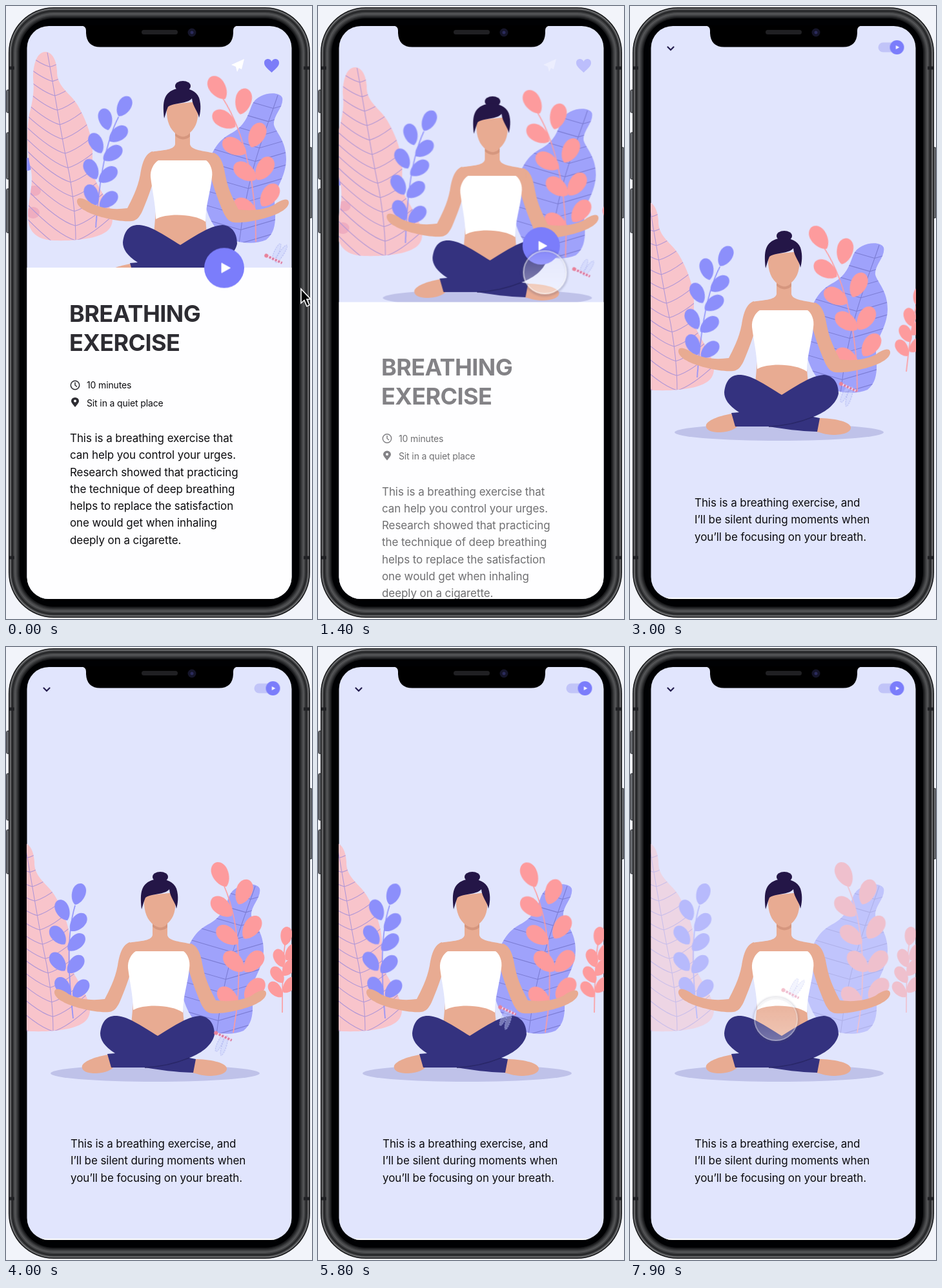
Write an HTML page that moves like this. It is 474x949 px and loops after 8000 ms.

```html
<!DOCTYPE html>
<html lang="en">
<head>
<meta charset="utf-8">
<title>Breathing exercise</title>
<style>
html, body { margin: 0; width: 100%; height: 100%; overflow: hidden; background: #f2f4fa; }
svg { display: block; width: 100vw; height: 100vh; }
text { font-family: Inter, Roboto, sans-serif; fill: #0c0c0f; }
.body { font-size: 17px; letter-spacing: -.08px; }
.small { font-size: 14px; letter-spacing: -.13px; }
.title { font-size: 36px; font-weight: 700; letter-spacing: -.6px; fill: #2d2c32; }
.skin { fill: #e8ab92; }
.navy { fill: #34327f; }
.vein { fill: none; stroke-width: 1.1; }

.anim { animation: 8s ease-in-out infinite; }
#scene { animation-name: scene; }
#panel { animation-name: panel; }
#info { animation-name: info; }
#button { animation-name: button; }
#actions { animation-name: out; }
#controls { animation-name: in; }
.plants { animation-name: fade; }
#blueSprig { animation-name: sway; --lean: 10.7deg; transform-origin: 104px 575px; }
#pinkSprig { animation-name: sway; --lean: -9.4deg; transform-origin: 352px 597px; }
#sideSprig { animation-name: sway; --lean: 6.5deg; transform-origin: 428px 566px; }
#fly { animation-name: fly; }
#wings { animation-name: flap; }
#touch { animation-name: touch; }
#cursor { animation-name: cursor; animation-timing-function: linear; }

@keyframes scene {
  0%, 15.5% { transform: translate(35px, -232px); }
  24.5%, 100% { transform: none; }
}
@keyframes panel {
  0%, 12.5% { transform: none; }
  13.5%, 15.5% { transform: translateY(1px); }
  24.5%, 100% { transform: translateY(511px); }
}
@keyframes info {
  0%, 12.5% { transform: none; opacity: 1; }
  13.5%, 15.5% { transform: translateY(1px); opacity: 1; }
  20%, 100% { transform: translateY(200px); opacity: 0; }
}
@keyframes button {
  0%, 12.5% { transform: translate(338px, 405.5px); }
  13.5%, 15.5% { transform: translate(338px, 406.5px); }
  24.5%, 100% { transform: translate(413.5px, 64px) scale(.355); }
}
@keyframes out {
  0%, 15.5% { opacity: 1; }
  19%, 100% { opacity: 0; }
}
@keyframes in {
  0%, 19% { opacity: 0; }
  25%, 100% { opacity: 1; }
}
@keyframes fade {
  0%, 94% { opacity: 1; }
  98.75% { opacity: .5; }
  100% { opacity: .4; }
}
@keyframes sway {
  0%, 13.75%, 38%, 63%, 87.6% { transform: rotate(var(--lean)); }
  25.5%, 50.5%, 75.5%, 100% { transform: none; }
}
@keyframes fly {
  0%, 15.5% { transform: translate(380px, 624px) rotate(25deg); }
  26.25% { transform: translate(340px, 580px) rotate(25deg); }
  50% { transform: translate(337px, 603px) rotate(25deg); }
  72.5% { transform: translate(294px, 563px) rotate(25deg); }
  87.5% { transform: translate(294px, 581px) rotate(33deg); }
  98.75%, 100% { transform: translate(249px, 537px) rotate(27deg); }
}
@keyframes flap {
  0%, 15.5%, 98%, 100% { transform: none; }
  26%, 89% { transform: scaleY(-1); }
}
@keyframes touch {
  0%, 2.4% { transform: translate(444px, 432px); opacity: 0; }
  2.5% { transform: translate(444px, 432px); opacity: 1; }
  9%, 16% { transform: translate(342px, 411px); opacity: 1; }
  23.1% { transform: translate(444px, 425px); opacity: 1; }
  23.2% { transform: translate(444px, 425px); opacity: 0; }
  83% { transform: translate(444px, 598px); opacity: 0; }
  83.1% { transform: translate(444px, 598px); opacity: 1; }
  87.5% { transform: translate(380px, 592px); opacity: 1; }
  94%, 96% { transform: translate(226px, 576px); opacity: .9; }
  98.75%, 100% { transform: translate(226px, 576px); opacity: .7; }
}
@keyframes cursor {
  0% { transform: translate(457px, 438px); opacity: 1; }
  2.4% { transform: translate(444px, 433px); opacity: 1; }
  2.5%, 23.1% { transform: translate(444px, 425px); opacity: 0; }
  23.2% { transform: translate(444px, 425px); opacity: 1; }
  25% { transform: translate(475px, 430px); opacity: 1; }
  25.1%, 81% { transform: translate(475px, 602px); opacity: 0; }
  81.1% { transform: translate(475px, 602px); opacity: 1; }
  83% { transform: translate(444px, 598px); opacity: 1; }
  83.1%, 100% { transform: translate(444px, 598px); opacity: 0; }
}
</style>
</head>
<body>
<svg viewBox="0 0 474 949" preserveAspectRatio="none">
  <defs>
    <clipPath id="screen"><rect x="32.5" y="31" width="410" height="887" rx="34"/></clipPath>
    <path id="pinkShape" d="M62 71C72 72 78 84 79 100C78 125 100 135 110 152C122 172 134 200 134 225C134 252 132 260 144 280C158 305 170 325 163 340C155 360 110 364 75 363C50 362 34 352 34 325C34 300 44 275 38 250C32 225 32 190 36 168C42 145 44 130 42 112C42 90 48 70 62 71Z"/>
    <path id="blueShape" d="M346 385C354 366 388 362 393 374C396 388 378 402 380 416C383 428 399 440 399 470C398 500 380 515 381 535C382 555 386 580 368 594C350 602 318 600 300 586C278 568 266 530 274 500C278 465 290 442 312 430C336 418 340 400 346 385Z"/>
    <clipPath id="pinkClip"><use href="#pinkShape"/></clipPath>
    <clipPath id="blueClip"><use href="#blueShape"/></clipPath>
    <path id="leaf" d="M0 19C-7 16-12 6-12-4C-12-15-5-20 0-20C5-20 12-15 12-4C12 6 7 16 0 19Z"/>
    <path id="arm" d="M192 457C180 461 176 475 173 493C169 515 159 533 153 545C132 548 112 545 98 538C90 532 82 528 77 530C72 534 76 543 88 549C100 557 140 567 160 565C168 564 172 558 176 550C183 534 191 512 195 497Z"/>
    <linearGradient id="glass" x1="0" y1="0" x2="0" y2="1">
      <stop offset="0" stop-color="#fff" stop-opacity=".1"/>
      <stop offset="1" stop-color="#fff" stop-opacity=".48"/>
    </linearGradient>
    <filter id="soft" x="-20%" y="-20%" width="140%" height="140%"><feGaussianBlur stdDeviation="1.5"/></filter>
  </defs>

  <g fill="#707378" stroke="#1b1c1f">
    <rect x=".8" y="130" width="5" height="35" rx="1.5"/>
    <rect x=".8" y="196" width="5" height="72" rx="1.5"/>
    <rect x=".8" y="283" width="5" height="68" rx="1.5"/>
    <rect x="469" y="219" width="5" height="109" rx="1.5"/>
  </g>
  <g id="frame"></g>
  <path d="M5 96H13M461 96H470M5 854H13M461 854H470" stroke="#202124" stroke-width="5"/>

  <g clip-path="url(#screen)">
    <rect x="32" y="30" width="412" height="889" fill="#e1e5fd"/>

    <g id="scene" class="anim">
      <ellipse cx="231" cy="660" rx="162" ry="13" fill="#bfc2e9"/>
      <g class="anim plants">
        <g transform="translate(-35 232)">
          <ellipse cx="34" cy="245" rx="8" ry="10" fill="#8c8ffb"/>
          <use href="#pinkShape" fill="#f8c4cb"/>
          <g clip-path="url(#pinkClip)">
            <ellipse cx="44" cy="286" rx="10" ry="8" fill="#efadc0"/>
            <ellipse cx="42" cy="320" rx="10" ry="9" fill="#efadc0"/>
            <path id="pinkVeins" class="vein" stroke="#b197d6"/>
          </g>
        </g>
        <g id="blueSprig" class="anim"></g>
        <use href="#blueShape" fill="#9fa2fb"/>
        <g clip-path="url(#blueClip)"><path id="blueVeins" class="vein" stroke="#7c7dd4"/></g>
        <g id="pinkSprig" class="anim"></g>
        <g id="sideSprig" class="anim"></g>
      </g>

      <!-- figure -->
      <g class="skin">
        <use href="#arm"/>
        <use href="#arm" transform="matrix(-1 0 0 1 478 2)"/>
        <path d="M227 420V446C225 456 204 455 190 458C182 462 186 480 190 495L202 520L272 520L286 495C290 480 294 464 287 460C272 456 252 456 250 446V420Z"/>
        <path d="M197 550H273L276 585L236 606L194 585Z"/>
      </g>
      <path d="M227 427C234 437 245 436 250 428V434C244 440 234 440 227 433Z" fill="#d5967e"/>
      <path class="skin" d="M214 385L262 380C264 400 262 415 254 424C246 434 234 436 226 428C216 418 213 405 214 385Z"/>
      <g fill="#241647">
        <ellipse cx="239" cy="356" rx="12" ry="8"/>
        <path d="M210 406C208 385 207 368 226 361C240 357 258 360 264 374C268 386 266 398 264 405C263 396 254 388 253 375C246 384 226 381 216 388C213 395 212 400 210 406Z"/>
      </g>
      <path d="M201 471H275C281 475 286 486 284 497C282 520 274 540 274 566C258 554 215 552 197 562C197 540 191 515 189 497C188 486 194 475 201 471Z" fill="#fff"/>
      <g class="skin">
        <path d="M159 631C140 634 122 640 118 648C116 656 125 660 140 660C155 659 163 655 167 650Z"/>
        <path d="M292 638C315 638 340 643 342 652C343 660 330 664 315 664C303 664 295 660 288 659Z"/>
      </g>
      <path class="navy" d="M146 598C148 580 156 570 172 571C190 572 215 590 235 602C255 590 280 572 300 571C316 572 323 585 323 600C320 615 305 628 284 636L294 638L290 659C260 658 240 655 215 651H163L157 630L169 629C152 618 146 608 146 598Z"/>
      <path d="M284 636C262 645 238 650 215 651" fill="none" stroke="#292768" stroke-width="1.5"/>

      <g class="anim plants">
        <g id="fly" class="anim">
          <g id="wings" class="anim" fill="#c9d0fb" fill-opacity=".45" stroke="#a6aeef" stroke-width=".9" stroke-dasharray="2 1.5">
            <ellipse cx="5" cy="-13" rx="3.5" ry="16" transform="rotate(8)"/>
            <ellipse cx="-1" cy="-12" rx="3.5" ry="14"/>
          </g>
          <path d="M-13 0H14" stroke="#f4d9ea" stroke-width="3.4"/>
          <path d="M-13 0H14" stroke="#d9779f" stroke-width="3.4" stroke-dasharray="3 2"/>
          <circle cx="-13" r="3" fill="#e8829a"/>
        </g>
      </g>
    </g>

    <rect id="panel" class="anim" x="32" y="405" width="412" height="520" fill="#fefeff"/>

    <g id="info" class="anim">
      <text class="title" x="98" y="489">BREATHING</text>
      <text class="title" x="98" y="534">EXERCISE</text>
      <g fill="none" stroke="#2d2c32" stroke-width="1.5">
        <circle cx="107" cy="587" r="6.7"/>
        <path d="M107 582.5V587L110 589.5"/>
      </g>
      <path d="M107 621C103 616 101 614 101 611.5A6 5.5 0 0 1 113 611.5C113 614 111 616 107 621Z" fill="#2d2c32"/>
      <circle cx="107" cy="611.5" r="2" fill="#fff"/>
      <text class="small" x="125" y="592">10 minutes</text>
      <text class="small" x="125" y="619.5">Sit in a quiet place</text>
      <g id="details"></g>
    </g>

    <g id="actions" class="anim">
      <path d="M369 82L349 91L356 94L358 102L361 96L365 98Z" fill="#fff"/>
      <path d="M411.5 103C404 96 400 93 400 88C400 81 409 80 411.5 86C414 80 423 81 423 88C423 93 419 96 411.5 103Z" fill="#7c7df8"/>
    </g>

    <g id="controls" class="anim">
      <path d="M58.5 63.5L63 68L67.5 63.5" fill="none" stroke="#231c4e" stroke-width="2.2" stroke-linecap="round"/>
      <rect x="384.5" y="56.5" width="38" height="15" rx="7.5" fill="#c1c4f8"/>
      <g id="speech"></g>
    </g>

    <g id="button" class="anim">
      <circle r="31" fill="#7b7dfb"/>
      <path d="M-4-7.5L9.5 0L-4 7.5Z" fill="#fff" stroke="#fff" stroke-linejoin="round"/>
    </g>

    <g id="touch" class="anim">
      <circle r="34.5" cy="1" fill="none" stroke="#4a4a6a" stroke-opacity=".35" stroke-width="2.5" filter="url(#soft)"/>
      <circle r="34" fill="url(#glass)"/>
      <circle r="33" fill="none" stroke="#fff" stroke-opacity=".5" stroke-width="2"/>
    </g>
  </g>

  <path d="M116 30Q124 31 124 38V42Q125 63.5 146 63.5H330Q351 63.5 352 42V38Q352 31 360 30Z"/>
  <rect x="210" y="37" width="56" height="7" rx="3.5" fill="#202023"/>
  <circle cx="288" cy="41" r="6.5" fill="#15152a"/>
  <circle cx="288" cy="41" r="2.5" fill="#2b2b5c"/>

  <path id="cursor" class="anim" d="M0 0V22L5 17.5L9 27L13 25L9 16H15Z" stroke="#fff" stroke-width="1.6"/>
</svg>

<script>
const byId = id => document.getElementById(id);

function add(parent, name, attrs) {
  const node = document.createElementNS('http://www.w3.org/2000/svg', name);
  for (const key in attrs) node.setAttribute(key, attrs[key]);
  return byId(parent).appendChild(node);
}

// Nested rounded bands, each an inset and a grey level.
function bezel(bands) {
  for (const [inset, grey] of bands) {
    add('frame', 'rect', {
      x: 4 + inset, y: 2 + inset, width: 467 - 2 * inset, height: 945 - 2 * inset,
      rx: 70 - inset, fill: `rgb(${grey} ${grey + 1} ${grey + 3})`
    });
  }
}

function lines(id, x, y, rows) {
  rows.forEach((row, i) => {
    add(id, 'text', { class: 'body', x, y: y + i * 26.25 }).textContent = row;
  });
}

// Each leaf is x, y and tilt in degrees.
function sprig(id, color, size, stem, leaves) {
  add(id, 'path', { d: stem, fill: 'none', stroke: color, 'stroke-width': 1.6 });
  for (const [x, y, tilt] of leaves) {
    add(id, 'use', {
      href: '#leaf', fill: color,
      transform: `translate(${x} ${y}) rotate(${tilt}) scale(${size})`
    });
  }
}

// Side veins branch off a midrib at even steps.
function veins(id, midrib, count, rise) {
  const path = byId(id);
  path.setAttribute('d', midrib);
  const step = path.getTotalLength() / count;
  let d = midrib;
  for (let i = 1; i <= count + 2; i++) {
    const p = path.getPointAtLength(i * step);
    const drop = Math.max(0, i - count) * step;
    for (const side of [-1, 1]) {
      d += `M${p.x} ${p.y + drop}q${side * 28} -8 ${side * 75} ${-rise}`;
    }
  }
  path.setAttribute('d', d);
}

bezel([[0, 18], [1.5, 110], [3.5, 60], [5, 36], [7, 62], [9, 84], [11, 70], [13, 48], [15, 26], [17, 0]]);

lines('details', 99, 675, [
  'This is a breathing exercise that', 'can help you control your urges.',
  'Research showed that practicing', 'the technique of deep breathing',
  'helps to replace the satisfaction', 'one would get when inhaling',
  'deeply on a cigarette.'
]);
lines('speech', 100, 775, [
  'This is a breathing exercise, and', 'I’ll be silent during moments when',
  'you’ll be focusing on your breath.'
]);

veins('pinkVeins', 'M64 72C75 130 85 200 98 260C105 300 108 330 108 363', 13, 56);
veins('blueVeins', 'M386 370C370 420 340 480 326 600', 11, 22);

sprig('blueSprig', '#8c8ffb', .88, 'M104 575C98 520 92 450 107 400', [
  [112, 383, 18], [88, 408, -25], [111, 427, 42], [81, 447, -38], [108, 458, 45],
  [81, 488, -38], [107, 492, 42], [89, 527, -35], [115, 530, 40]
]);
sprig('pinkSprig', '#fd9b9d', 1.05, 'M352 597C366 520 364 430 338 370', [
  [333, 353, -25], [368, 380, 22], [335, 403, -48], [380, 435, 35], [344, 447, -52],
  [383, 488, 42], [354, 488, -45], [384, 530, 45], [345, 543, -48]
]);
sprig('sideSprig', '#fd9b9d', .75, 'M428 566C428 530 428 480 433 455', [
  [434, 448, 8], [424, 482, -20], [442, 473, 35], [421, 508, -35],
  [438, 497, 35], [418, 531, -40], [439, 524, 40]
]);
</script>
</body>
</html>
```
